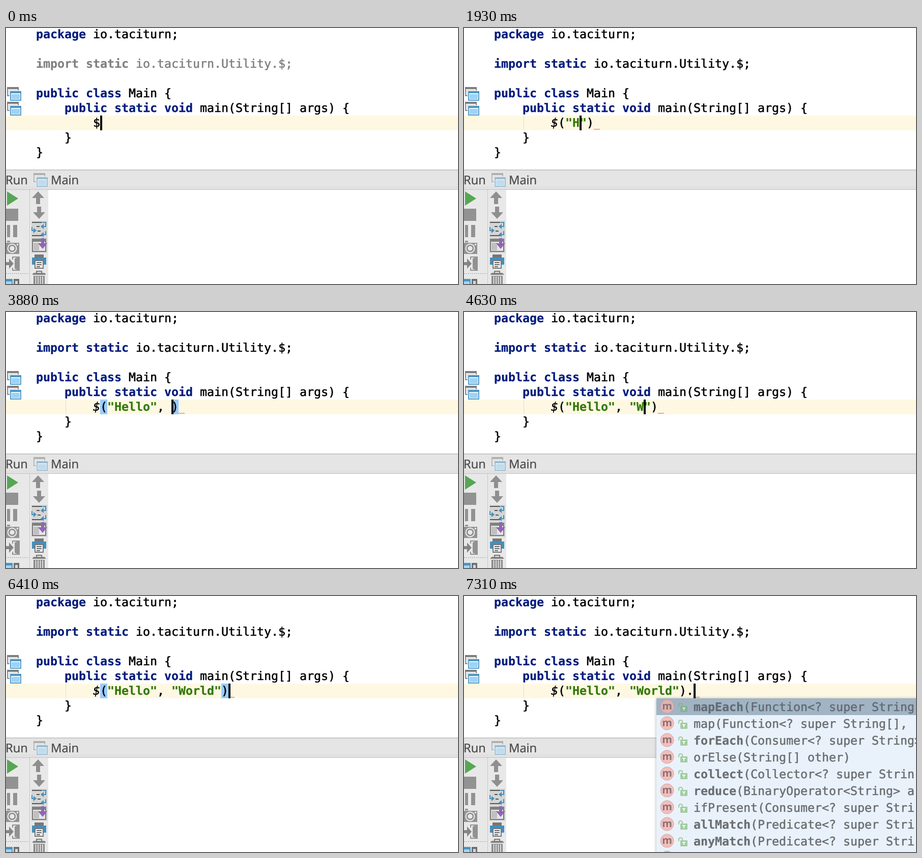
An HTML page for the animation above (8000 ms loop, 888 by 503 pixels).

```html
<!DOCTYPE html>
<html lang="en">
<head>
<meta charset="utf-8">
<title>Code completion</title>
<style>
html, body { margin: 0; width: 100%; height: 100%; overflow: hidden; background: #fff; }
svg { display: block; }
text { white-space: pre; text-rendering: geometricPrecision; }
text, tspan { fill: currentColor; stroke: currentColor; }
.code { font: 23.254px "DejaVu Sans Mono", monospace; color: #000; stroke-width: .55px; }
.label { font: 23.7px "Open Sans", sans-serif; color: #4c4c4c; stroke-width: .4px; }
.method { font: bold 20px "Open Sans", sans-serif; color: #8c7073; stroke: none; text-anchor: middle; }
.kw, .str, .bold { font-weight: bold; stroke-width: .25px; }
.kw { color: #001b7c; }
.str { color: #327807; }
.unused, .unused .kw { color: #808080; }
.item { color: #6b6e72; }
.chosen { color: #626b73; }
.resolved { font-style: italic; }
.wave { fill: none; stroke: #dc5a50; stroke-width: 1; }
</style>
</head>
<body>
<svg id="stage" width="888" height="503" viewBox="0 0 888 503"></svg>
<script>
const LOOP = 8000, CHAR = 14, LEFT = 59, CODE_X = 171, ROW_Y = 172, ROW_H = 29;
const RESOLVED = 1630, POPUP = 7310;

// time, text before the caret, text after it, highlighted braces
const steps = [
  [0, '$', ''],
  [140, '$(', ')', true],
  [1340, '$("', '")'],
  [1930, '$("H', '")'],
  [2080, '$("He', '")'],
  [2230, '$("Hel', '")'],
  [2380, '$("Hell', '")'],
  [2530, '$("Hello', '")'],
  [3430, '$("Hello"', ')'],
  [3730, '$("Hello",', ')'],
  [3880, '$("Hello", ', ')', true],
  [4180, '$("Hello", "', '")'],
  [4630, '$("Hello", "W', '")'],
  [4770, '$("Hello", "Wo', '")'],
  [4920, '$("Hello", "Wor', '")'],
  [5370, '$("Hello", "Worl', '")'],
  [5510, '$("Hello", "World', '")'],
  [5960, '$("Hello", "World"', ')'],
  [6410, '$("Hello", "World")', '', true],
  [7160, '$("Hello", "World").', '']
];

const methods = [
  ['mapEach', '(Function<? super String', true],
  ['map', '(Function<? super String[], '],
  ['forEach', '(Consumer<? super String>', true],
  ['orElse', '(String[] other)'],
  ['collect', '(Collector<? super Strin', true],
  ['reduce', '(BinaryOperator<String> a', true],
  ['ifPresent', '(Consumer<? super Stri'],
  ['allMatch', '(Predicate<? super Stri', true],
  ['anyMatch', '(Predicate<? super Stri', true],
  ['', '']
];

const esc = s => s.replace(/&/g, '&amp;').replace(/</g, '&lt;');
const rect = (x, y, w, h, fill, more = '') =>
  `<rect x="${x}" y="${y}" width="${w}" height="${h}" fill="${fill}" ${more}/>`;
const path = (d, fill, more = '') => `<path d="${d}" fill="${fill}" ${more}/>`;
const line = (d, color, width) => path(d, 'none', `stroke="${color}" stroke-width="${width}"`);
const span = (cls, s) => `<tspan class="${cls}">${esc(s)}</tspan>`;
const baseline = row => 20 + ROW_H * row;
const code = (row, body, indent = 0, more = '') =>
  `<text class="code" x="${LEFT + indent * CHAR}" y="${baseline(row)}" ${more}>${body}</text>`;
const wave = (from, to) => {
  let d = `M${from} 200`;
  for (let x = from + 2, up = true; x <= to; x += 2, up = !up) d += `L${x} ${up ? 198 : 200}`;
  return `<path class="wave" d="${d}"/>`;
};

function windows(x, y, opacity = 1) {
  return `<g transform="translate(${x} ${y})" opacity="${opacity}">` +
    rect(1, 2, 21, 16, '#efefef', 'stroke="#8b8b8b" stroke-width="2"') +
    rect(0, 1, 23, 4, '#7c7c7c') + rect(4, 7, 15, 9, '#cfcfcf') +
    rect(5, 8, 23, 20, '#fff') +
    rect(7, 10, 20, 17, '#eaf6fd', 'stroke="#5a9dc8" stroke-width="2"') +
    rect(6, 9, 22, 4, '#4a93c1') + rect(9, 15, 16, 10, '#9dd3f6') + '</g>';
}

function editor() {
  return code(0, span('kw', 'package') + ' io.taciturn;') +
    code(2, span('kw', 'import static') + ' io.taciturn.Utility.$;', 0, 'id="import"') +
    code(4, span('kw', 'public class') + ' Main {') +
    code(5, span('kw', 'public static void') + ' main(String[] args) {', 4) +
    code(7, '}', 4) + code(8, '}') +
    windows(2, 115) + windows(2, 144);
}

function runIcons() {
  const g = '#929292';
  return path('M2 321L24 335L2 349Z', '#56a655') +
    rect(0, 355, 24, 24, g) +
    rect(2, 387, 6, 24, g) + rect(14, 387, 8, 24, g) +
    // camera
    rect(2, 418, 6, 3, g) + rect(0, 422, 26, 22, g) +
    '<circle cx="12" cy="433" r="9.5" fill="#e8e8e8"/>' +
    '<circle cx="12" cy="433" r="6" fill="#e8e8e8" stroke="#8b8b8b" stroke-width="2.5"/>' +
    rect(21, 424, 3, 3, '#eee') +
    // exit
    line('M13 455V450H26V476H13V471', g, 2) + path('M17 453L26 449V477L17 473Z', g) +
    path('M0 460H6V453L15 463L6 473V466H0Z', '#858585') +
    path('M0 482.5H45', 'none', 'stroke="#999" stroke-dasharray="2 2"') +
    // layout
    rect(0, 493, 13, 10, '#4a94c2') + rect(0, 498, 11, 5, '#a5d6f5') +
    rect(15, 493, 11, 10, '#707070') + rect(18, 497, 5, 6, '#d8d8d8');
}

function consoleIcons() {
  const g = '#8f8f8f', dark = '#777', blue = '#438fbd', violet = '#9065b6';
  return path('M63 321L75 334H67V346H59V334H51Z', g) +
    path('M61 351H69V362H77L65 375L53 362H61Z', g) +
    // soft wrap
    rect(50, 379, 31, 31, '#d5d5d5') +
    line('M51 382H71M51 408H71M60 390H66M69 390H72M62 399H68', '#555', 2) +
    line('M72 382H78V390H73M51 391V398H56M78 399V406H72', blue, 2) +
    path('M68 390L74 385V395Z', blue) + path('M60 398L54 393V403Z', blue) +
    path('M68 406L74 401V411Z', blue) +
    // scroll to end
    rect(50, 411, 31, 31, '#d5d5d5') +
    rect(52, 415, 26, 24, '#e6e6e6', `stroke="${dark}" stroke-width="2"`) +
    rect(51, 414, 28, 6, '#808080') + rect(54, 422, 11, 15, '#c0c0c0') +
    path('M69 413H75V423H81L72 434L63 423H69Z', violet) +
    // printer
    rect(56, 445, 18, 6, dark) + rect(51, 451, 28, 14, blue) +
    rect(57, 457, 16, 15, '#f5f5f5', `stroke="${dark}" stroke-width="2"`) +
    line('M60 461H70M60 465H70M60 469H67', '#666', 2) +
    // bin
    line('M60 481V478H70V481', dark, 2) + path('M52 485Q52 481 57 481H73Q78 481 78 485Z', '#828282') +
    rect(54, 487, 22, 16, '#8a8a8a') + line('M58.5 488V503M63 488V503M67.5 488V503M72 488V503', '#e0e0e0', 2);
}

function runPanel() {
  return rect(0, 278, 888, 40, '#e5e5e5') + rect(0, 278, 888, 2, '#c8c8c8') +
    rect(0, 311, 888, 6, '#e1e1e1') + rect(0, 317, 888, 1, '#c2c2c2') +
    '<text class="label" x="-1" y="306.5">Run</text><text class="label" x="88" y="306.5">Main</text>' +
    windows(54, 284, 0.5) +
    rect(0, 318, 83, 185, '#e8e8e8') + rect(46, 318, 1, 185, '#c6c6c6') +
    runIcons() + consoleIcons();
}

function bulb() {
  return '<g id="bulb"><circle cx="81" cy="180" r="9" fill="#fbd75c" stroke="#c49a3a"/>' +
    rect(77, 188, 8, 3, '#e5bd4d') + rect(76, 191, 10, 2, '#777') + rect(77, 194, 8, 2, '#777') +
    rect(79, 197, 4, 2, '#777') +
    '<circle cx="86" cy="192" r="5" fill="#d84a40"/>' + rect(85, 189, 2, 4, '#fff') +
    rect(85, 194, 2, 1.5, '#fff') + '</g>';
}

function popup() {
  const rows = methods.map(([name, args, strong], i) => {
    const y = 217 + 33 * i, green = i ? '#a3cca3' : '#86b397';
    return `<circle cx="399" cy="${y}" r="13" fill="${i ? '#f2bfbb' : '#e0b3b2'}" stroke="#d3a3a2"/>` +
      `<text class="method" x="399" y="${y + 6}">m</text>` +
      line(`M422 ${y + 1}V${y - 3}Q422 ${y - 6} 425.5 ${y - 6}Q429 ${y - 6} 429 ${y - 3}V${y}`, green, 2) +
      rect(425, y - 1, 14, 12, green, 'rx="1"') +
      line(`M429 ${y + 3}H435M432 ${y + 3}V${y + 8}`, i ? '#f2faf2' : '#d5e3dc', 2) +
      `<text class="code ${i ? 'item' : 'chosen'}" x="451" y="${y + 9}">` +
      span(strong ? 'bold' : '', name) + esc(args) + '</text>';
  });
  return '<g id="popup">' +
    rect(378, 201, 520, 320, '#e9f2fb', 'filter="url(#shadow)"') +
    rect(378, 201, 510, 33, '#a0b4c4') + rows.join('') + '</g>';
}

const stage = document.getElementById('stage');
stage.innerHTML =
  '<defs><filter id="shadow" x="-10%" y="-10%" width="120%" height="120%">' +
  '<feDropShadow dx="0" dy="1" stdDeviation="3" flood-opacity=".3"/></filter></defs>' +
  rect(0, 0, 888, 503, '#fff') + rect(0, ROW_Y, 888, ROW_H, '#fef8e3') +
  editor() + runPanel() + '<g id="live"></g>' + bulb() + popup();

const byId = id => document.getElementById(id);
const live = byId('live'), importLine = byId('import'), bulbIcon = byId('bulb'), list = byId('popup');
const show = (el, on) => el.setAttribute('visibility', on ? 'visible' : 'hidden');

function typedLine(t) {
  const [, before, after, braces] = steps.findLast(s => s[0] <= t);
  const text = before + after, end = CODE_X + text.length * CHAR;
  const brace = c => rect(CODE_X + text.indexOf(c) * CHAR, ROW_Y, CHAR, ROW_H, '#99ccff');
  const body = text.slice(1).split(/("[^"]*")/)
    .map(s => s[0] === '"' ? span('str', s) : esc(s)).join('');
  let out = t < 140 ? '' : rect(117, ROW_Y, 1, ROW_H, '#e3dfd0');
  if (braces) out += brace('(') + brace(')');
  out += code(6, span(t < RESOLVED ? '' : 'resolved', '$') + body, 8);
  if (t >= 140) out += wave(t >= 590 && t < RESOLVED ? CODE_X + CHAR : end, end + 13);
  return out + rect(CODE_X + before.length * CHAR, ROW_Y, 4, ROW_H, '#000');
}

let shown = '';
function draw(t) {
  const next = typedLine(t);
  if (next !== shown) live.innerHTML = shown = next;
  importLine.classList.toggle('unused', t < RESOLVED);
  show(bulbIcon, t >= 1190 && t < 1340);
  show(list, t >= POPUP);
}

const start = performance.now();
function tick() {
  draw((performance.now() - start) % LOOP);
  requestAnimationFrame(tick);
}
tick();
</script>
</body>
</html>
```
